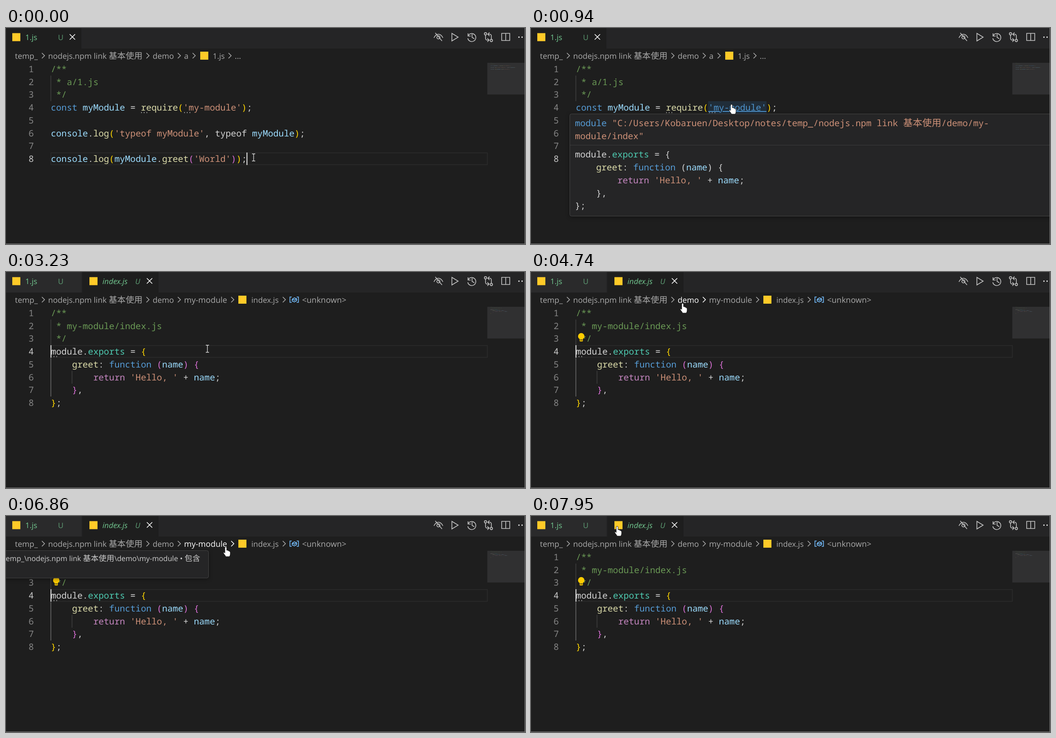
An HTML page for the animation above (8000 ms loop, 1157 by 484 pixels).

```html
<!DOCTYPE html>
<html lang="en">
<head>
<meta charset="utf-8">
<title>Editor: jump to module</title>
<style>
html, body { margin: 0; height: 100%; overflow: hidden; background: #1e1e1e; }
svg { display: block; }
text { white-space: pre; text-rendering: geometricPrecision; }
.code { font: 19.68px 'Noto Sans Mono', 'Noto Sans CJK SC', 'Noto Sans CJK', monospace; }
.ui { font-family: 'Open Sans', 'Noto Sans CJK SC', 'Noto Sans CJK', sans-serif; }
.cjk { font-size: 1.08em; }
.line { fill: none; stroke: #c5c5c5; stroke-width: 1.6; }
.float { filter: drop-shadow(0 2px 5px rgba(0, 0, 0, .4)); }
.panel { fill: #252526; stroke: #454545; }
.b { fill: #569cd6; } .v { fill: #9cdcfe; } .y { fill: #dcdcaa; } .w { fill: #d4d4d4; }
.s, .k { fill: #ce9178; } .g { fill: #6a9955; } .c { fill: #c586c0; } .t { fill: #4ec9b0; }
.p { fill: #ffd700; } .q { fill: #da70d6; }
.link .k { fill: #4e94ce; text-decoration: underline; }
.plain :is(.p, .q, .v) { fill: #d4d4d4; }
</style>
</head>
<body>
<svg id="stage" width="1157" height="484" viewBox="0 0 1157 484"></svg>
<script>
const LOOP = 8000, LEFT = 100, CHAR = 11.81, ROW = 28.75;
const stage = document.getElementById('stage');

// Rows alternate token class and token text.
const files = {
  main: [
    'g~/**', 'g~ * a/1.js', 'g~ */',
    "b~const ~v~myModule~w~ = ~y~require~p~(~k~'my-module'~p~)~w~;", '',
    "v~console~w~.~y~log~p~(~s~'typeof myModule'~w~, typeof ~v~myModule~p~)~w~;", '',
    "v~console~w~.~y~log~p~(~v~myModule~w~.~y~greet~q~(~s~'World'~q~)~p~)~w~;"
  ],
  index: [
    'g~/**', 'g~ * my-module/index.js', 'g~ */',
    'w~module.~t~exports~w~ = ~p~{',
    'y~    greet~w~: ~b~function ~q~(~v~name~q~) {',
    "c~        return ~s~'Hello, '~w~ + ~v~name~w~;",
    'q~    }~w~,', 'p~}~w~;'
  ]
};
const hint = [
  [220, 'b~module ~s~"C:/Users/Kobaruen/Desktop/notes/temp_/nodejs.npm link 基本使用/demo/my-'],
  [249, 's~module/index"'],
  [290, 'w~module.~t~exports~w~ = {'],
  [319, 'y~    greet~w~: ~b~function ~w~(~v~name~w~) {'],
  [347.5, "c~        return ~s~'Hello, '~w~ + ~v~name~w~;"],
  [376.5, 'w~    },'],
  [405, 'w~};']
];

// Each step changes some properties and keeps the rest.
const steps = [
  [0, { file: 'main', row: 8, col: 37, caret: 1, cursor: ['beam', 552, 290] }],
  [150, { caret: 0, cursor: ['beam', 505, 166] }],
  [300, { cursor: ['beam', 470, 170] }],
  [420, { cursor: ['beam', 451, 173] }],
  [550, { link: 1, cursor: ['hand', 447, 171] }],
  [670, { caret: 1 }],
  [820, { hint: .6 }],
  [940, { hint: 1 }],
  [2710, { hint: 0, row: 4, col: 29, cursor: ['arrow', 447, 169] }],
  [2860, { file: 'index', col: 0, link: 0, plain: 1, cursor: ['beam', 449, 172] }],
  [3230, { plain: 0 }],
  [3350, { caret: 0 }],
  [3470, { bulb: 1 }],
  [3770, { caret: 1 }],
  [4050, { cursor: ['beam', 447, 162] }],
  [4200, { cursor: ['beam', 406, 97] }],
  [4350, { caret: 0, hover: 'demo', cursor: ['hand', 373, 70] }],
  [4500, { cursor: ['hand', 356, 71] }],
  [4620, { cursor: ['hand', 343, 70] }],
  [4740, { caret: 1, cursor: ['hand', 338, 70] }],
  [5020, { cursor: ['hand', 372, 69] }],
  [5140, { hover: 'my-module', cursor: ['hand', 415, 69] }],
  [5260, { caret: 0, cursor: ['hand', 439, 69] }],
  [5630, { tip: .6, tipEnd: 452, tipText: 'my-module • 包含' }],
  [5750, { tip: 1, caret: 1 }],
  [6310, { caret: 0 }],
  [6710, { caret: 1 }],
  [6860, { cursor: ['hand', 490, 69] }],
  [7010, { tip: 0, hover: 'index.js', cursor: ['hand', 549, 68] }],
  [7160, { caret: 0, cursor: ['hand', 571, 67] }],
  [7560, { tip: .6, tipEnd: 582, tipText: 'my-module\\index.js • 未跟踪' }],
  [7680, { tip: 0, caret: 1, hover: '', cursor: ['hand', 500, 51] }],
  [7830, { cursor: ['hand', 320, 36] }],
  [7950, { cursor: ['hand', 192, 23] }]
];

const clean = s => s.replace(/</g, '&lt;').replace(/[一-龥]+/g, '<tspan class="cjk">$&</tspan>');
const rect = (x, y, w, h, fill, more = '') =>
  `<rect x="${x}" y="${y}" width="${w}" height="${h}" fill="${fill}" ${more}/>`;
const path = (d, more = '') => `<path class="line" d="${d}" ${more}/>`;
const ui = (x, y, text, fill, size = 17.5, more = '') =>
  `<text class="ui" x="${x}" y="${y}" fill="${fill}" font-size="${size}" ${more}>${clean(text)}</text>`;
const badge = (x, y) => rect(x, y, 18, 18, '#ffca28');
const baseline = n => 185 + (n - 4) * ROW;
const rowTop = n => baseline(n) - 21;

function code(x, y, row) {
  const parts = row.split('~');
  let spans = '';
  for (let i = 0; i + 1 < parts.length; i += 2)
    spans += `<tspan class="${parts[i]}">${clean(parts[i + 1])}</tspan>`;
  return `<text class="code" x="${x}" y="${y}">${spans}</text>`;
}

function tabs(s) {
  const green = '#73c991', index = s.file === 'index', x = index ? 320 : 148;
  let out = rect(0, 0, 1157, 46, '#252526');
  out += index ? rect(0, 0, 168, 46, '#2a2a2b') + rect(170, 0, 170, 46, '#1e1e1e')
               : rect(0, 0, 168, 46, '#1e1e1e');
  out += badge(14, 11.5) + ui(43, 27, '1.js', green, 17) + ui(116, 27, 'U', green, 16.5, 'opacity=".7"');
  if (index)
    out += badge(186, 11.5) + ui(215, 27, 'index.js', green, 17, 'font-style="italic"') +
      ui(288, 27, 'U', green, 16.5, 'font-style="italic" opacity=".75"');
  return out + path(`M${x - 6} 14l12 12m0-12l-12 12`, 'style="stroke:#fff"');
}

function actions() {
  return path('M954 22q4-8 10-8t10 8M957 11l15 18') + '<circle class="line" cx="964" cy="21" r="3.5"/>' +
    path('M994 12v17l14-8.5z') +
    path('M1030 12v6h6M1030.5 17a9 9 0 1 1-1 6M1039 14v7l5 3') +
    path('M1069 16v7q0 4 4 4h4m-4-4l4 4l-4 4M1082 25v-7q0-4-4-4h-4m4-4l-4 4l4 4') +
    '<circle class="line" cx="1069" cy="13" r="2.6"/><circle class="line" cx="1082" cy="28" r="2.6"/>' +
    path('M1105 12h18v16h-18zM1114 12v16') +
    rect(1142, 19, 3, 3, '#c5c5c5') + rect(1149, 19, 3, 3, '#c5c5c5');
}

function crumbs(s) {
  const tone = name => name && s.hover === name ? '#fff' : '#a9a9a9';
  const item = (x, name, arrow, size) => ui(x, 69, name, tone(name), size) +
    (arrow ? path(`M${arrow - 3} 56l6 6l-6 6`, `style="stroke:${tone(name)}"`) : '');
  let out = item(20, 'temp_', 83) + item(94, 'nodejs.npm link 基本使用', 316) + item(327, 'demo', 386);
  if (s.file === 'main')
    return out + item(397, 'a', 419) + badge(433, 53) + item(461, '1.js', 499, 17) + item(510, '...', 0);
  return out + item(397, 'my-module', 505, 18) + badge(518, 53) + item(547, 'index.js', 620, 17.2) +
    path('M637 56h-4v12h4M648 56h4v12h-4M638 61l5-3l5 2v4l-5 3l-5-2zM638 61l5 2l5-3', 'style="stroke:#75beff"') +
    item(660, '<unknown>', 0, 18);
}

function guides(s) {
  const dim = '#404040', bright = '#707070';
  const guide = (col, from, to, fill) => rect(LEFT + col * CHAR - .7, rowTop(from), 1.4, (to - from) * ROW, fill);
  if (s.file === 'main') return guide(0, 2, 4, s.row === 4 ? bright : dim);
  return guide(0, 2, 4, dim) + guide(0, 5, 8, bright) + guide(4, 6, 7, dim);
}

function editor(s) {
  const rows = files[s.file].map((row, i) => code(LEFT, baseline(i + 1), row)).join('');
  const numbers = files[s.file].map((_, i) =>
    `<text class="code" x="62" y="${baseline(i + 1)}" text-anchor="end" fill="${
      i + 1 === s.row ? '#c6c6c6' : '#858585'}">${i + 1}</text>`).join('');
  const dots = (x, n) => path(`M${x} 189.5h${n * 6 - 4}`, 'style="stroke:#a0a0a0;stroke-width:2;stroke-dasharray:2 4"');
  let out = rect(LEFT, rowTop(s.row) + .7, 973, 26.6, 'none', 'stroke="#2b2b2b" stroke-width="1.6"');
  out += guides(s) + numbers;
  if (s.hint) out += rect(395, 164, 130, 28, '#264f78', 'opacity=".3"');
  out += rows;
  if (s.file === 'main') out += dots(301, 3) + dots(397, 3);
  else if (!s.plain) out += dots(106, 2);
  out += rect(1073, 78, 83, 71, '#303031') +
    `<g transform="translate(1070 71.7) scale(.1 .07)" opacity=".65" aria-hidden="true">${rows}</g>`;
  if (s.bulb)
    out += '<circle cx="112" cy="144" r="7.2" fill="#fc0"/>' + rect(108.5, 148, 7, 7.5, '#fc0', 'rx="1"') +
      rect(109.5, 151.5, 5, 1.5, '#1e1e1e');
  if (s.caret) out += rect(LEFT + s.col * CHAR - 1, rowTop(s.row), 2.4, 28, '#c8c8c8');
  return out;
}

function popups(s) {
  let out = '';
  if (s.hint)
    out += `<g opacity="${s.hint}"><g class="float">${rect(86.5, 192.5, 1090, 229, '', 'class="panel" rx="4"')}</g>` +
      rect(87, 262, 1070, 1, '#3d3d3d') + hint.map(([y, row]) => code(98, y, row)).join('') + '</g>';
  if (s.tip)
    out += `<g opacity="${s.tip}"><g class="float">${
      rect(-20, 77.5, s.tipEnd + 19.5, 61.5, '', 'class="panel" rx="4"')}</g>` +
      ui(s.tipEnd - 19, 101, 'temp_\\nodejs.npm link 基本使用\\demo\\' + s.tipText, '#ccc', 16.2, 'text-anchor="end"') + '</g>';
  return out;
}

const shapes = {
  beam: path('M-3.5-8h2.5l1 1l1-1h2.5M0-7v14M-3.5 8h2.5l1-1l1 1h2.5', 'style="stroke:#e4e4e4;stroke-width:1.3"'),
  hand: '<path fill="#fff" stroke="#111" stroke-width=".9" d="M-2 13V2a2 2 0 0 1 4 0v6l1-.5q2 0 2.5 1.5q2-.3 2.5 1.2q2 0 2 2.3v4q0 3-2 5.5H0q-1-2.5-4-6q-2-2.5-.8-3.4q1.3-.8 2.8 1.4z"/>',
  arrow: '<path fill="#fff" stroke="#111" stroke-width=".9" d="M0 0v18l4-4l3 6l3-1.3l-3-6h5z"/>' +
    path('M7 5h8M11 1v8', 'style="stroke:#fff;stroke-width:1.5;stroke-dasharray:2.5 1"')
};

function draw(s) {
  const [kind, x, y] = s.cursor;
  stage.setAttribute('class', (s.link ? 'link ' : '') + (s.plain ? 'plain' : ''));
  stage.innerHTML = rect(0, 0, 1157, 484, '#1e1e1e') + tabs(s) + actions() + crumbs(s) + editor(s) + popups(s) +
    `<g transform="translate(${x} ${y})">${shapes[kind]}</g>` +
    rect(1156, 0, 1, 484, '#777') + rect(0, 483, 1157, 1, '#777');
}

let shown = 0;
function tick() {
  const t = performance.now() % LOOP;
  const past = steps.filter(([at]) => at <= t);
  if (past.length !== shown) {
    shown = past.length;
    draw(Object.assign({}, ...past.map(step => step[1])));
  }
  requestAnimationFrame(tick);
}
tick();
</script>
</body>
</html>
```
